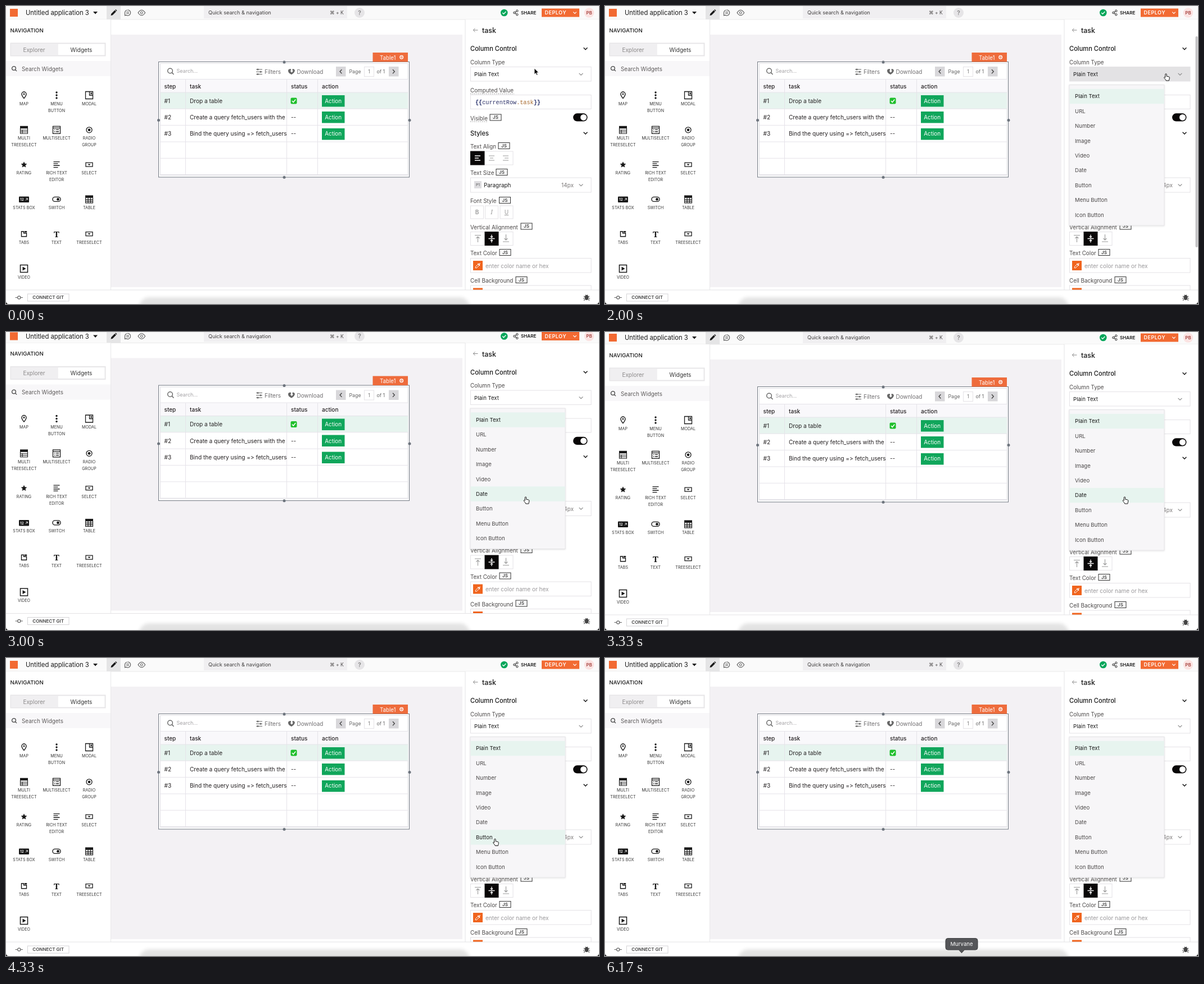
An HTML page for the animation above (6.34 s loop, 1055x531 px).

```html
<!DOCTYPE html>
<html lang="en">
<head>
<meta charset="utf-8">
<title>Column type</title>
<style>
  html, body { margin: 0; width: 100%; height: 100%; overflow: hidden; background: #fff; }
  svg { display: block; width: 1055px; height: 531px; font-family: Inter, "Open Sans", sans-serif; }
  text { white-space: pre; font-variant-ligatures: none; font-feature-settings: "calt" 0; }
  .mono { font-family: "Liberation Mono", monospace; }
  .serif { font-family: "Noto Serif", serif; }
</style>
</head>
<body>
<svg id="stage" viewBox="0 0 1055 531"></svg>
<script>
const LOOP = 6340, FPS = 6;
const INK = '#191919', GREY = '#7b7878', LINE = '#e4e2e6', ORANGE = '#f26a32', MINT = '#e7f4ef';

// y is the middle of the capital letters
const text = (x, y, str, size = 9.8, fill = INK, extra = '') =>
  `<text x="${x}" y="${y + size * 0.364}" font-size="${size}" fill="${fill}" ${extra}>${str}</text>`;
const MID = 'text-anchor="middle"', MEDIUM = 'font-weight="500"', BOLD = 'font-weight="600"', HEADING = 'font-weight="450"';
const rect = (x, y, w, h, fill, extra = '') =>
  `<rect x="${x}" y="${y}" width="${w}" height="${h}" fill="${fill}" ${extra}/>`;
const box = (x, y, w, h, stroke = LINE, fill = '#fff') => rect(x, y, w, h, fill, `stroke="${stroke}"`);
const dot = (x, y, r, fill, extra = '') => `<circle cx="${x}" cy="${y}" r="${r}" fill="${fill}" ${extra}/>`;
const stroke = (d, color = INK, width = 1.2, extra = '') =>
  `<path d="${d}" fill="none" stroke="${color}" stroke-width="${width}" ${extra}/>`;
const fillPath = (d, color = INK) => `<path d="${d}" fill="${color}"/>`;
const at = (x, y, body) => `<g transform="translate(${x} ${y})">${body}</g>`;
const chevron = (x, y, color = INK, width = 1.5, s = 3.4) =>
  stroke(`M${x - s} ${y - s / 2}l${s} ${s}l${s} ${-s}`, color, width);
const magnifier = (x, y, r, color) =>
  stroke(`M${x - r} ${y}a${r} ${r} 0 1 0 ${2 * r} 0a${r} ${r} 0 1 0 ${-2 * r} 0M${x + r * .7} ${y + r * .7}l${r * .8} ${r * .8}`, color, 1.3);
const pencil = color => fillPath('M-5 5l.8-3.2L2-4.4l2.4 2.4L-1.8 4.2ZM2.7-5.1l1-.9 2.3 2.3-1 1Z', color);
const dropper = color => stroke('M-4.2 4.2v-2L1-3 3 -1-2.2 4.2Z', color, 1) + stroke('M0-3.5L3.5 0M2-2L4-4', color, 1.5);

function topBar() {
  return rect(0, -10, 1055, 34, '#fafafa') + rect(0, 23.5, 1055, 1, '#e9e9e9')
    + rect(7, 5, 14, 14, ORANGE)
    + text(35, 12, 'Untitled application 3', 11.25)
    + fillPath('M155 10h8l-4 4.4Z')
    + rect(179, 0, 25, 24, '#e5e5e6') + at(191.5, 12, pencil(INK))
    + stroke('M216.5 7a5 5 0 1 1-2.6 9.2l-2.4.8V12a5 5 0 0 1 5-5ZM214 10.8h5M214 13.2h5', '#555', 1.1)
    + stroke('M235 12q6.3-9.6 12.6 0q-6.3 9.6-12.6 0Z', '#555', 1.1) + dot(241.3, 12, 2, 'none', 'stroke="#555"')
    + rect(352, 0, 255, 22, '#f0eff1')
    + text(360, 12, 'Quick search &amp; navigation', 9.1, '#3f3d3d') + text(576, 12, '⌘ + K', 8.6, '#4b4848')
    + dot(629, 12, 9, '#e6e5e7') + text(629, 12, '?', 10.5, '#777', MID + ' ' + MEDIUM)
    + dot(886.3, 12, 6.3, '#03a65a') + stroke('M883.2 12l2.2 2.3 4-4.3', '#fff', 1.3)
    + stroke('M909.5 8.5l-5 3.5 5 3.5', INK, 1)
    + [[909.3, 8.7], [904.5, 12], [909.3, 15.3]].map(([x, y]) => dot(x, y, 1.7, '#fff', `stroke="${INK}"`)).join('')
    + text(916, 12, 'SHARE', 8.1, INK, BOLD)
    + rect(953, 4.5, 67, 15, ORANGE) + text(958.5, 12, 'DEPLOY', 9, '#fff', BOLD + ' letter-spacing=".5"')
    + chevron(1012, 12, '#fff', 1.2, 2.8)
    + dot(1037.5, 12, 8.7, '#fbe3e2') + text(1037.5, 12, 'PB', 8, '#a4403c', MID + ' ' + BOLD);
}

const dropBox = stroke('M-6-3.5H6V3.5H-6Z', INK, 1.3) + fillPath('M-2.5-1.2h5L0 1.6Z');
const grid = rect(-7, -7, 14, 4.5, INK) + stroke('M-6.5-3V6.5H6.5V-3M-6.5.5h13M-6.5 3.5h13', INK, 1.1);
const widgets = [
  ['MAP', stroke('M0 5.5C-3 2-4-.2-4-2a4 4 0 0 1 8 0C4-.2 3 2 0 5.5Z', INK, 1.4) + dot(0, -2, 1.4, INK)],
  ['MENU BUTTON', [-5, 0, 5].map(y => dot(0, y, 1.7, INK)).join('')],
  ['MODAL', stroke('M-6.5-6.5h13v13h-13ZM.5-6v6h6M2.5-4.5l2.5 2.5m0-2.5l-2.5 2.5', INK, 1.3)],
  ['MULTI TREESELECT', grid + stroke('M-3 0V6', INK, 1.1)],
  ['MULTISELECT', stroke('M-6.5-6.5h13v13h-13ZM-6-3.5H6M-4-.5h1.5m1.5 0h5M-4 3.2h1.5m1.5 0h5', INK, 1.3)],
  ['RADIO GROUP', stroke('M-5 0a5 5 0 1 0 10 0a5 5 0 1 0-10 0', INK, 1.3) + dot(0, 0, 2.4, INK)],
  ['RATING', fillPath('M0-5.3l1.6 3.5 3.8.4-2.9 2.6.9 3.8L0 3.1-3.4 5l.9-3.8-2.9-2.6 3.8-.4Z')],
  ['RICH TEXT EDITOR', stroke('M-5.5-5h11M-5.5-1.7h8M-5.5 1.7h11M-5.5 5h8', INK, 1.4)],
  ['SELECT', dropBox],
  ['STATS BOX', rect(-9, -5, 18, 10.5, INK, 'rx="1"') + text(-7, .3, '12', 6.5, '#fff', BOLD) + stroke('M3 2l3.3-3.5M3.5-1.5h2.8v2.8', '#fff', .9)],
  ['SWITCH', stroke('M-3-4h6a4 4 0 0 1 0 8h-6a4 4 0 0 1 0-8Z', INK, 1.4) + dot(2.5, 0, 2.4, INK)],
  ['TABLE', grid + stroke('M-2-3V6M2.5-3V6', INK, 1.1)],
  ['TABS', stroke('M-4.5-4.5h4v3h5v6h-9Z', INK, 1.4) + rect(.8, -5.2, 4.4, 2.4, INK)],
  ['TEXT', text(0, 0, 'T', 15, INK, MID + ' class="serif" font-weight="700"')],
  ['TREESELECT', dropBox],
  ['VIDEO', stroke('M-6.5-6.5h13v13h-13Z', INK, 1.5) + fillPath('M-2.5-3.5L3.5 0l-6 3.5Z')]
];

function leftPanel() {
  const cells = widgets.map(([name, icon], i) => {
    const x = 32 + 58 * (i % 3), y = 174 + 61.8 * Math.floor(i / 3);
    const lines = name === 'RICH TEXT EDITOR' ? ['RICH TEXT', 'EDITOR'] : name === 'STATS BOX' ? [name] : name.split(' ');
    return at(x, y - 15, icon)
      + lines.map((s, k) => text(x, y + 12 * k, s, 7.1, '#333', MID + ' letter-spacing=".08"')).join('');
  }).join('');
  return rect(0, 24, 186, 490, '#fff') + rect(186, 24, 1, 482, '#e8e7e9')
    + text(7.5, 43.5, 'NAVIGATION', 9.6, INK, MEDIUM)
    + rect(7.5, 65.5, 170, 24, '#e7e6e8') + rect(9, 67, 83, 21, '#f0eff1') + rect(92.5, 67.5, 83, 20, '#fff')
    + text(50, 78, 'Explorer', 10, '#8b8989', MID) + text(134, 78, 'Widgets', 10, '#333', MID)
    + rect(0, 98, 186, 27, '#f8f7f9') + magnifier(14, 111, 3.4, '#444') + text(28, 112, 'Search Widgets', 9.9, '#5c5959')
    + cells;
}

function tableWidget() {
  const label = '#231f20', line = '#e5e3e9';
  const rows = [['#1', 'Drop a table'], ['#2', 'Create a query fetch_users with the'], ['#3', 'Bind the query using =&gt; fetch_users']];
  let out = box(271.5, 99.5, 446, 205.5, '#737a83')
    + box(274.5, 102.5, 440.5, 199, '#e0dfe4')
    + rect(275, 131, 440, 23, '#f9f8fb') + rect(275, 154, 440, 29, MINT);
  out += stroke('M275 130.5h440' + [154, 183.2, 212.6, 242, 271.3, 300.5].map(y => `M275 ${y}h440`).join('')
    + [319.5, 499.5, 554.5].map(x => `M${x} 131V300`).join(''), line, 1);
  out += magnifier(292, 115.5, 4.3, '#555') + text(303.5, 116, 'Search...', 9, '#a3a1a4')
    + stroke('M445 113h11M445 117.3h11M445 121.5h11', '#666', 1.1)
    + dot(448, 113, 1.5, '#666') + dot(453, 117.3, 1.5, '#666') + dot(448, 121.5, 1.5, '#666')
    + text(460, 117.5, 'Filters', 10, '#706e70')
    + fillPath('M502 115.5a3 3 0 0 1 3.5-3.2h1.5v3h-1.5l2.8 3.5 2.8-3.5h-1.5v-3h1.4a3 3 0 0 1 2.7 3.8c-.8 2.6-3.6 5.2-5.7 5.9-3-.9-6-3.5-6-6.5Z', '#666')
    + text(517.5, 117.5, 'Download', 9.9, '#706e70')
    + rect(587, 108, 17.5, 17.5, '#d8d7da') + rect(681, 108, 17.5, 17.5, '#d8d7da')
    + stroke('M597.4 113.2l-3.3 3.6 3.3 3.6M688 113.2l3.3 3.6-3.3 3.6', '#444', 1.4)
    + text(610.5, 117, 'Page', 8.8, '#666') + box(637.5, 108.5, 17, 17) + text(646, 117, '1', 8.8, '#777', MID)
    + text(659.5, 117, 'of 1', 8.9, '#666');
  [[281.5, 'step'], [327, 'task'], [507, 'status'], [562, 'action']].forEach(([x, s]) => { out += text(x, 143, s, 10, label, MEDIUM); });
  rows.forEach(([step, task], i) => {
    const y = 169 + 29.4 * i;
    out += text(281.5, y, step, 10.1, label) + `<g clip-path="url(#taskCell)">${text(327, y, task, 10.1, label)}</g>`
      + rect(562, Math.round(y) - 10, 40.5, 20.5, '#10a65b') + text(582.2, y, 'Action', 9.9, '#fff', MID)
      + (i ? text(507, y, '--', 10, label) : rect(506.5, 163.5, 11, 11, '#1fbf2c', 'rx="2"') + stroke('M509 169l2.2 2.5 4-5', '#fff', 1.5));
  });
  out += [[495, 100], [718, 203.5], [495, 305.3], [271.5, 203.5]].map(([x, y]) => dot(x, y, 2.5, '#6d747d')).join('');
  return out + rect(652.5, 83, 62.5, 16.5, '#ee6c3c') + text(665, 92, 'Table1', 9.7, '#fff')
    + dot(703.7, 91.3, 2.8, 'none', 'stroke="#fff" stroke-width="1.3"') + dot(703.7, 91.3, 1, '#fff');
}

const jsBadge = (x, y) => rect(x, y - 5.5, 20, 11, '#fafafa', 'stroke="#333"') + text(x + 10, y, 'JS', 8, '#222', MID + ' ' + MEDIUM);
const swatch = y => box(826.5, y, 214.5, 25.5) + rect(831, y + 4.5, 17, 17, '#f0641e') + at(839.5, y + 13, dropper('#fff'));

function rightPanel() {
  const label = '#4b4848', dash = 'stroke-dasharray="2 1.5"';
  const labels = [[100, 'Column Type'], [150, 'Computed Value'], [200, 'Visible', 861], [250.5, 'Text Align', 876], [297.5, 'Text Size', 872],
    [347.5, 'Font Style', 877.5], [394, 'Vertical Alignment', 916], [440.5, 'Text Color', 878], [489.5, 'Cell Background', 907]];
  let out = rect(817, 24, 238, 490, '#fff') + rect(816.5, 24, 1, 482, '#e4e3e5')
    + stroke('M839.5 43h-8M834.5 39.8l-3.2 3.2 3.2 3.2', '#888', 1)
    + text(847, 43.5, 'task', 12.4, INK, MEDIUM)
    + text(826, 76, 'Column Control', 11.1, INK, HEADING) + chevron(1031, 76)
    + text(826, 226.5, 'Styles', 11.1, INK, HEADING) + chevron(1031, 226.5);
  for (const [y, s, badge] of labels) out += text(826, y, s, 9.85, label) + (badge ? jsBadge(badge, y - 1.5) : '');
  out += stroke('M826 156.5h78M826 206h31', '#888', .8, dash)
    + rect(826.5, 108.5, 214.5, 25.5, '#fff', `id="select" stroke="${LINE}"`) + text(833, 122, 'Plain Text', 9.6) + chevron(1023, 121.5, '#888', 1.1)
    + box(826.5, 158.5, 214.5, 25)
    + text(835, 171, '<tspan fill="#27306b" font-weight="700">{{</tspan>currentRow<tspan fill="#a86a2e">.task</tspan><tspan fill="#27306b" font-weight="700">}}</tspan>', 10.17, '#2b3068', 'class="mono"')
    + rect(1009, 191.3, 25.5, 14.2, '#090707', 'rx="7.1"') + dot(1027.5, 198.4, 5.5, '#fff');
  out += box(826.5, 259, 75.5, 24) + rect(826, 258.5, 25.5, 25, '#090707')
    + stroke('M834 267h10M834 271h7M834 275h10', '#fff', 1.3)
    + stroke('M859 267h10M861 271h6M859 275h10M884 267h10M887 271h7M884 275h10', '#999', 1.1)
    + box(826.5, 306, 214.5, 26) + rect(833, 312, 13, 13, '#dedde0') + text(839.5, 318.5, 'P1', 6.8, '#555', MID)
    + text(850, 319.5, 'Paragraph', 9.9) + text(988, 319.5, '14px', 10, GREY) + chevron(1023, 319, '#888', 1.1);
  [[826.5, 'B', BOLD], [852.5, 'I', 'font-style="italic" class="serif"'], [879, 'U', 'text-decoration="underline"']].forEach(([x, s, style]) => {
    out += box(x, 356, 23, 23) + text(x + 11.5, 367.5, s, 10, '#999', MID + ' ' + style);
  });
  out += box(826.5, 402.5, 75.5, 24) + rect(851.5, 402, 25, 25, '#090707')
    + stroke('M834 408.5h11M839.5 421V411M836.5 414l3-3 3 3M884 420h11M889.5 407v10M886.5 414l3 3 3-3', '#999', 1.1)
    + stroke('M858.5 414.5h11M864 407.5v5M862 410.5l2 2 2-2M864 421.5v-5M862 418.5l2-2 2 2', '#fff', 1.3);
  return out + swatch(449.5) + text(853, 463, 'enter color name or hex', 10, '#9a989b') + swatch(498);
}

function bottomBar() {
  const legs = 'M-5-2.5l2 1.5M5-2.5l-2 1.5M-6 1.5h2.5M6 1.5h-2.5M-5 5l2-1.5M5 5l-2-1.5M-2-5l1 1.5M2-5l-1 1.5';
  return rect(0, 506, 1055, 40, '#fff') + rect(0, 505.5, 1055, 1, '#e4e3e5')
    + stroke('M16.5 519.5h4M26 519.5h4', '#666', 1.2) + dot(23.3, 519.5, 2.6, 'none', 'stroke="#666" stroke-width="1.2"')
    + box(38.5, 513, 73.5, 13, '#d5d4d7') + text(75.2, 519.5, 'CONNECT GIT', 8, '#444', MID + ' ' + BOLD)
    + at(1033, 519.5, '<ellipse rx="3.3" ry="4.5" fill="#444"/>' + stroke(legs, '#444', 1.1));
}

const options = ['Plain Text', 'URL', 'Number', 'Image', 'Video', 'Date', 'Button', 'Menu Button', 'Icon Button'];
const ITEM = 26.4, LIST_TOP = 147.8;
const dropdown = () => rect(826, 140.5, 169, 250.5, '#f7f6f8', 'stroke="#e3e2e5" filter="url(#lift)"')
  + options.map((s, i) => rect(826.5, LIST_TOP + ITEM * i, 168, ITEM, MINT, 'class="option"')
    + text(836, LIST_TOP + ITEM * (i + .5), s, 9.6, INK, 'class="optionLabel"')).join('');

const stage = document.getElementById('stage');
stage.innerHTML = `<defs>
    <clipPath id="taskCell"><rect x="320" y="154" width="179" height="90"/></clipPath>
    <filter id="soft" x="-10%" y="-60%" width="120%" height="220%"><feGaussianBlur stdDeviation="3"/></filter>
    <filter id="lift"><feDropShadow dx="0" dy="1" stdDeviation="1.5" flood-opacity=".1"/></filter>
  </defs>
  <g id="page">`
  + rect(187, 24, 630, 490, '#fff') + rect(187, 51, 625, 450, '#f3f1f4')
  + tableWidget() + topBar() + leftPanel() + rightPanel()
  + rect(1050.5, 54, 4, 376, '#c2c1c3', 'id="scrollbar" rx="2"')
  + bottomBar() + `<g id="list">${dropdown()}</g></g>`
  + rect(237, 519, 588, 50, '#000', 'rx="18" opacity=".11" filter="url(#soft)"')
  + '<g id="tip"><path d="M610 499.5h49q4 0 4 4v12.5q0 4-4 4h-19.5l-5 5.5-5-5.5H610q-4 0-4-4V503.5q0-4 4-4Z" fill="#555659" stroke="#3d3e40"/>'
  + text(634.5, 510, 'Murvane', 9.6, '#fff', MID) + '</g>'
  + `<g id="cursor"><path id="arrow" d="M0 0V10.8L2.5 8.5 4.2 12.3 6 11.5 4.4 7.8H7.7Z" fill="#000" stroke="#fff" stroke-width=".8"/>
    <path id="hand" d="M-1.2 1a1.2 1.2 0 0 1 2.4 0v3.2l4 .8q1.4.4 1.2 2l-.7 3.2-.3 1.8H.2l-.6-1.6-2.6-3q-.9-1.2.2-1.8q.8-.3 1.6.8Z" fill="#fff" stroke="#111"/></g>`
  + fillPath('M0 526q0 5 5 5H0ZM1055 526q0 5-5 5h5Z', '#000');

const cursorPath = [[0, 940, 111], [170, 942, 111], [830, 1019, 120], [1330, 1019, 120], [1670, 998, 121], [2170, 998, 121],
  [2830, 924.5, 294], [3670, 924.5, 294], [4170, 870, 322.5], [4670, 870, 322.5], [5170, 866, 368], [5500, 800, 440], [5830, 634, 545]];
const scrollPath = [[2500, 0], [2830, -4.7], [3000, -4.5], [3330, -2], [3670, -.5], [3830, 0]];

function sample(path, time) {
  const next = path.findIndex(key => key[0] > time);
  if (next === 0) return path[0].slice(1);
  if (next < 0) return path[path.length - 1].slice(1);
  const a = path[next - 1], b = path[next], k = (time - a[0]) / (b[0] - a[0]), ease = k * k * (3 - 2 * k);
  return a.slice(1).map((v, i) => v + (b[i + 1] - v) * ease);
}

const el = id => document.getElementById(id);
const show = (node, visible) => node.setAttribute('visibility', visible ? 'visible' : 'hidden');
const optionRects = [...document.querySelectorAll('.option')], optionLabels = [...document.querySelectorAll('.optionLabel')];

function render(ms) {
  // The picture advances in sixths of a second.
  const time = Math.floor((ms % LOOP + 4) * FPS / 1000) * 1000 / FPS + 4;
  const [x, y] = sample(cursorPath, time), [shift] = sample(scrollPath, time);
  const open = time >= 1500, pageY = y - shift;
  const overSelect = open && x > 826 && x < 1041 && pageY > 108 && pageY < 134;
  const overList = open && x > 826 && x < 995 && pageY > 140 && pageY < 391;
  const hovered = overList ? Math.floor((pageY - LIST_TOP) / ITEM) : -1;

  el('page').setAttribute('transform', `translate(0 ${shift})`);
  el('select').setAttribute('fill', overSelect ? '#e3e2e4' : '#fff');
  el('list').setAttribute('display', open ? 'inline' : 'none');
  optionRects.forEach((node, i) => {
    const active = i === 0 || i === hovered;
    node.setAttribute('fill-opacity', active ? 1 : 0);
    optionLabels[i].setAttribute('fill', active ? INK : '#4b4848');
  });
  show(el('scrollbar'), open && time < 2400);
  show(el('tip'), time >= 5900);
  el('cursor').setAttribute('transform', `translate(${x} ${y})`);
  show(el('hand'), overSelect || overList);
  show(el('arrow'), !(overSelect || overList));
}

const start = performance.now();
(function tick() {
  render(performance.now() - start);
  requestAnimationFrame(tick);
})();
</script>
</body>
</html>
```
